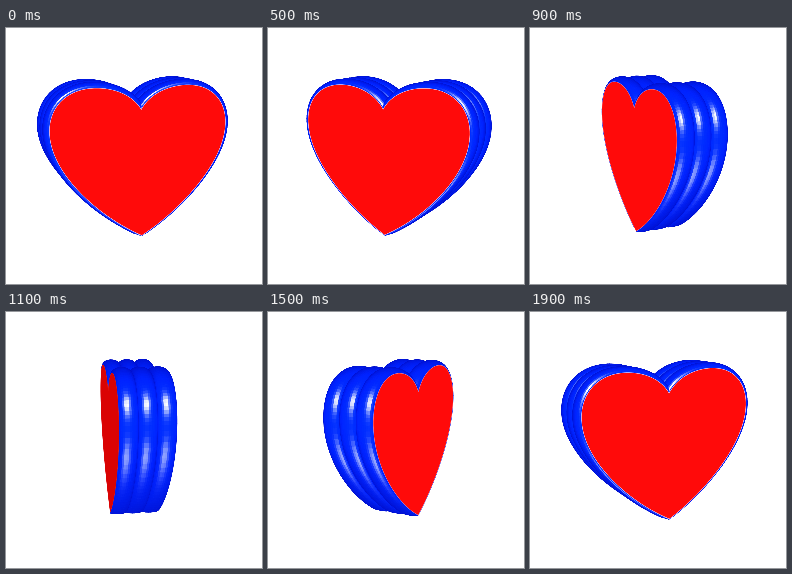
Recreate the animation shown at these times as an HTML page with a canvas. Size 256 px wide and 256 px high, loop 2 s.

```html
<!DOCTYPE html>
<html lang="en">
<head>
<meta charset="utf-8">
<title>Turning heart</title>
<style>
  html, body { margin: 0; width: 100%; height: 100%; overflow: hidden; background: #fff; }
  canvas { display: block; width: 100vw; height: 100vh; }
</style>
</head>
<body>
<canvas id="stage" width="768" height="768"></canvas>
<script>
const ctx = document.getElementById('stage').getContext('2d');
ctx.scale(3, 3); // drawn oversized for smooth shading
const RAD = Math.PI / 180;
const STEP_MS = 100, STEPS = 20;
const TURN = 9 * RAD, FRONT_STEP = 1.9;
const PITCH = 12 * RAD, ROLL = 0.4 * RAD;
const CAMERA = 600, CENTER = { x: 127.8, y: 127.3 };
const SIZE = 0.985, HALF_DEPTH = 25, RIDGES = 3, RIDGE_PARTS = 14, BULGE = 5;
const CURVE_PARTS = 24;

// Right half of the heart, from notch to tip, as cubic curves.
const CURVES = [
  [[0, -50], [9, -65], [28, -72], [46, -72]],
  [[46, -72], [72, -72], [89, -56], [89, -32]],
  [[89, -32], [89, 8], [42, 54], [0, 77]]
];

// Directions in which the rim shines, as tilt below the eye line, with strength.
const LIGHTS = [
  { tilt: -9 * RAD, power: 1.1 },
  { tilt: 37 * RAD, power: 0.6 }
].map(({ tilt, power }) => ({ x: 0, y: Math.sin(tilt), z: Math.cos(tilt), power }));

function bezier([a, b, c, d], t) {
  const s = 1 - t;
  return [0, 1].map(k => SIZE *
    (s * s * s * a[k] + 3 * s * s * t * b[k] + 3 * s * t * t * c[k] + t * t * t * d[k]));
}

function makeOutline() {
  const half = [];
  for (const curve of CURVES)
    for (let i = 0; i < CURVE_PARTS; i++) half.push(bezier(curve, i / CURVE_PARTS));
  const left = half.slice(1).reverse().map(([x, y]) => [-x, y]);
  return [...half, bezier(CURVES[2], 1), ...left];
}

const outline = makeOutline();
const count = outline.length;
const normals = outline.map((_, i) => {
  const [ax, ay] = outline[(i + count - 1) % count];
  const [bx, by] = outline[(i + 1) % count];
  const len = Math.hypot(bx - ax, by - ay);
  const ny = (ax - bx) / len;
  return [(by - ay) / len, ny > 0 ? ny * 0.35 : ny];
});

// Depth and outward offset of each ring, front to back.
const rings = [];
const ridgeRadius = HALF_DEPTH / RIDGES;
for (let r = 0; r < RIDGES; r++) {
  const mid = HALF_DEPTH - ridgeRadius * (2 * r + 1);
  for (let k = r ? 1 : 0; k <= RIDGE_PARTS; k++) {
    const a = Math.PI * k / RIDGE_PARTS;
    rings.push([mid + ridgeRadius * Math.cos(a), BULGE * Math.sin(a)]);
  }
}

function place(x, y, z, angle) {
  const c = Math.cos(angle), s = Math.sin(angle);
  const x1 = x * c - z * s, z1 = x * s + z * c;
  const y2 = y * Math.cos(PITCH) + z1 * Math.sin(PITCH);
  const z2 = z1 * Math.cos(PITCH) - y * Math.sin(PITCH);
  const px = x1 * Math.cos(ROLL) + y2 * Math.sin(ROLL);
  const py = y2 * Math.cos(ROLL) - x1 * Math.sin(ROLL);
  const scale = CAMERA / (CAMERA - z2);
  return { x: px, y: py, z: z2, sx: CENTER.x + px * scale, sy: CENTER.y + py * scale };
}

const minus = (a, b) => ({ x: a.x - b.x, y: a.y - b.y, z: a.z - b.z });
const cross = (a, b) => ({
  x: a.y * b.z - a.z * b.y, y: a.z * b.x - a.x * b.z, z: a.x * b.y - a.y * b.x
});
const dot = (a, b) => a.x * b.x + a.y * b.y + a.z * b.z;
const cosine = (a, b) => dot(a, b) / (Math.sqrt(dot(a, a) * dot(b, b)) || 1);

// Cosine between a surface normal and the line to the camera.
const facing = (normal, p) => cosine(normal, { x: -p.x, y: -p.y, z: CAMERA - p.z });

function trace(points) {
  ctx.beginPath();
  for (const p of points) ctx.lineTo(p.sx, p.sy);
  ctx.closePath();
}

function rimColor(normal, f) {
  const shine = Math.min(1, LIGHTS.reduce((sum, light) =>
    sum + light.power * Math.pow(Math.max(0, cosine(normal, light)), 50), 0));
  const mix = base => Math.round(base + (255 - base) * shine);
  return `rgb(${mix(0)},${mix(15 + 32 * f)},${mix(Math.min(255, 200 + 90 * f))})`;
}

function drawRim(angle) {
  const mesh = rings.map(([z, out]) => outline.map(([x, y], i) =>
    place(x + normals[i][0] * out, y + normals[i][1] * out, z, angle)));
  const quads = [];
  for (let j = 0; j < rings.length - 1; j++) {
    for (let i = 0; i < count; i++) {
      const n = (i + 1) % count;
      const pts = [mesh[j][i], mesh[j][n], mesh[j + 1][n], mesh[j + 1][i]];
      const normal = cross(minus(pts[3], pts[0]), minus(pts[1], pts[0]));
      const f = facing(normal, pts[0]);
      if (f > 0)
        quads.push({ pts, color: rimColor(normal, f), z: pts.reduce((sum, p) => sum + p.z, 0) });
    }
  }
  quads.sort((a, b) => a.z - b.z);
  ctx.lineWidth = 0.4;
  ctx.lineJoin = 'round';
  for (const { pts, color } of quads) {
    ctx.fillStyle = ctx.strokeStyle = color;
    trace(pts);
    ctx.fill();
    ctx.stroke();
  }
}

function drawFace(angle) {
  const pts = outline.map(([x, y]) => place(x, y, HALF_DEPTH, angle));
  const origin = place(0, 0, 0, angle), front = place(0, 0, 1, angle);
  const f = facing(minus(front, origin), place(0, 0, HALF_DEPTH, angle));
  if (f <= 0) return;
  const red = Math.min(255, Math.round(205 + 130 * f));
  const tint = Math.min(10, Math.round(30 * f));
  trace(pts);
  ctx.fillStyle = `rgb(${red},${tint},${tint})`;
  ctx.fill();
  ctx.lineWidth = 0.6;
  ctx.strokeStyle = `rgba(255,225,255,${Math.min(0.7, f)})`;
  ctx.stroke();
}

function draw(step) {
  let angle = (step - FRONT_STEP) * TURN;
  if (angle > Math.PI / 2) angle -= Math.PI;
  ctx.fillStyle = '#fff';
  ctx.fillRect(0, 0, 256, 256);
  drawRim(angle);
  drawFace(angle);
}

let shown = -1;
const start = performance.now();
function tick() {
  const step = Math.floor((performance.now() - start) / STEP_MS) % STEPS;
  if (step !== shown) draw(shown = step);
  requestAnimationFrame(tick);
}
tick();
</script>
</body>
</html>
```
